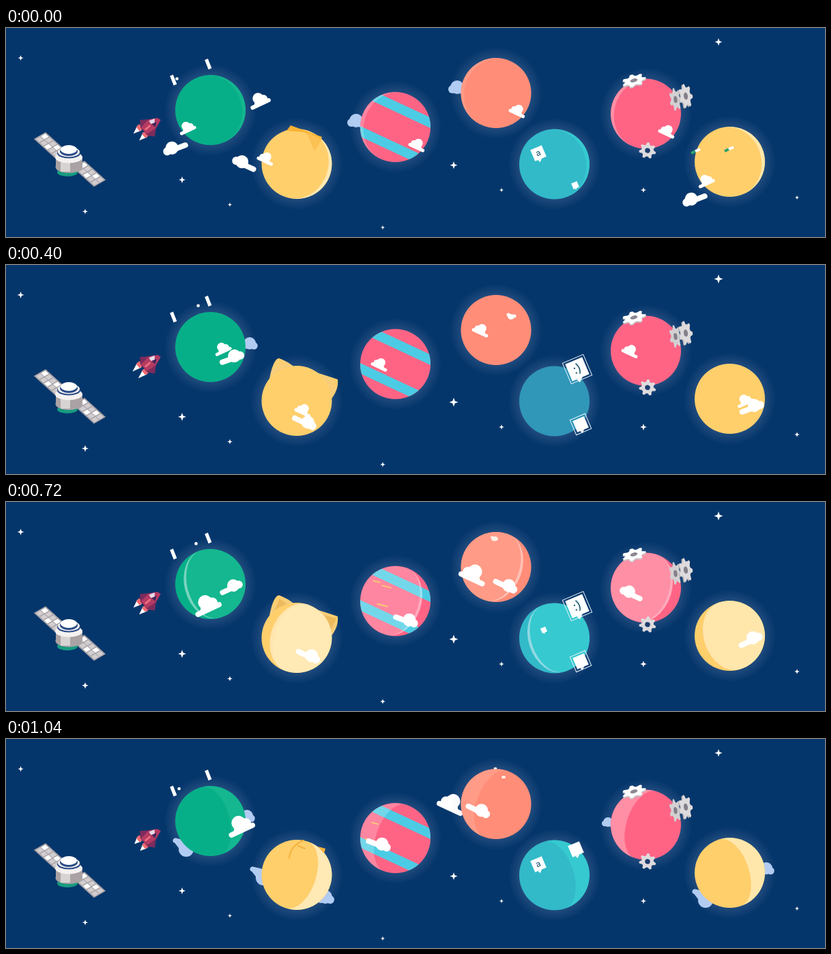
An HTML page with a canvas that plays this animation: 1200 px wide and 307 px high, repeating every 1.08 s.

```html
<!DOCTYPE html>
<html lang="en">
<head>
<meta charset="utf-8">
<title>Planets</title>
<style>
html, body { margin: 0; width: 100%; height: 100%; overflow: hidden; background: #05366b; }
canvas { display: block; width: 1200px; height: 307px; }
</style>
</head>
<body>
<canvas id="stage" width="1200" height="307"></canvas>
<script>
const c = document.getElementById('stage').getContext('2d');
const LOOP = 1080, STEP = 40, TAU = Math.PI * 2, R = 51.5;
const WHITE = '#fff', HAZE = '#b0ccf3', YELLOW = '#ffcf6c', PINK = '#ff6485';
let t = 0;

const lerp = (a, b, k) => a + (b - a) * k;
const ramp = (a, b) => Math.min(1, Math.max(0, (t - a) / (b - a)));
const during = (a, b) => t >= a && t < b;

function poly(color, ...p) {
  c.fillStyle = color;
  c.beginPath();
  for (let i = 0; i < p.length; i += 2) c.lineTo(p[i], p[i + 1]);
  c.closePath();
  c.fill();
}
function oval(color, x, y, rx, ry = rx, a = 0) {
  c.fillStyle = color;
  c.beginPath();
  c.ellipse(x, y, rx, ry, a, 0, TAU);
  c.fill();
}
function line(color, w, x1, y1, x2, y2, cap = 'butt') {
  c.strokeStyle = color;
  c.lineWidth = w;
  c.lineCap = cap;
  c.beginPath();
  c.moveTo(x1, y1);
  c.lineTo(x2, y2);
  c.stroke();
}
function placed(x, y, deg, draw) {
  c.save();
  c.translate(x, y);
  c.rotate(deg * Math.PI / 180);
  draw();
  c.restore();
}

function star(x, y, r) {
  r *= .9 + .2 * Math.sin(Math.PI * t / LOOP);
  c.fillStyle = WHITE;
  c.beginPath();
  for (let i = 0; i < 8; i++) {
    const d = i % 2 ? r * .38 : r, a = i * TAU / 8;
    c.lineTo(x + d * Math.cos(a), y + d * Math.sin(a));
  }
  c.fill();
}

// Clouds: a puff on a bar, or a blob with a tail; m mirrors the shape.
function puff(x, y, m = 1, s = .8, color = WHITE) {
  placed(x, y, -25 * m, () => {
    c.scale(m * s, s);
    line(color, 6, -13, 5, 13, 5, 'round');
    poly(color, -10, 4, -5, -4, 10, -2, 13, 5);
    oval(color, 0, -4, 8);
    oval(color, 7, 0, 6);
  });
}
function tail(x, y, deg, m = 1, s = 1, color = WHITE) {
  placed(x, y, deg, () => {
    c.scale(m * s, s);
    line(color, 8, -6, 3, 15, 1, 'round');
    oval(color, -5, 0, 9.5);
    oval(color, -13, 3, 6);
  });
}
function haze(x, y, s = 1) {
  oval(HAZE, x, y, 10 * s);
  oval(HAZE, x - 7 * s, y + 3 * s, 6 * s);
  oval(HAZE, x + 7 * s, y + 4 * s, 6 * s);
}
function wisp(x, y) {
  line(HAZE, 7, x - 12, y - 9, x + 4, y - 5, 'round');
  poly(HAZE, x - 14, y - 7, x - 4, y + 6, x + 8, y - 4);
  oval(HAZE, x + 4, y + 4, 11);
}
// First pass: rest, cross the middle, reach the far side.
function drift(draw, x0, y0, x1, y1, x2, y2) {
  if (t >= 580) return;
  const a = ramp(180, 320), b = ramp(320, 520);
  draw(lerp(lerp(x0, x1, a), x2, b), lerp(lerp(y0, y1, a), y2, b));
}
// Second pass: one slide, then rest.
function slide(draw, x0, y0, x1, y1) {
  if (t < 580) return;
  const k = ramp(720, 880);
  draw(lerp(x0, x1, k), lerp(y0, y1, k));
}

// Lit strip between two meridians of the sphere.
function strip(u0, u1, deg, color) {
  placed(0, 0, deg, () => {
    c.fillStyle = color;
    c.beginPath();
    c.ellipse(0, 0, Math.abs(u0) * R, R, 0, -Math.PI / 2, Math.PI / 2, u0 < 0);
    c.ellipse(0, 0, Math.abs(u1) * R, R, 0, Math.PI / 2, -Math.PI / 2, u1 >= 0);
    c.fill();
  });
}
function shade(side, deg, light, from, to) {
  if (t < 240) strip(side * .9, side, deg, light);
  else if (during(420, 580)) strip(-side * .9, -side, deg, light);
  else if (t >= 580) {
    const k = ramp(from, to), u = lerp(-.66, .55, k);
    strip(side * u, side, deg, light);
    if (k < 1) strip(side * (u - .08), side * u, deg, 'rgba(255,255,255,.45)');
  }
}
function planet(x, y, color, side, deg, light, marks, from = 720, to = 880) {
  const g = c.createRadialGradient(x, y, R - 2, x, y, R + 16);
  g.addColorStop(0, 'rgba(190,195,230,.16)');
  g.addColorStop(1, 'rgba(190,195,230,0)');
  oval(g, x, y, R + 16);
  c.save();
  oval(color, x, y, R);
  c.clip();
  c.translate(x, y);
  if (marks) marks();
  shade(side, deg, light, from, to);
  c.restore();
}

function panel(x, y) {
  c.save();
  c.transform(.74, .67, -.86, .5, x, y);
  c.fillStyle = '#a5a0a5';
  c.fillRect(0, 0, 42, 20);
  for (let i = 0; i < 5; i++) for (let j = 0; j < 2; j++) {
    c.fillStyle = (i + j) % 3 ? '#d2cdcf' : WHITE;
    c.fillRect(2 + i * 8, 2 + j * 8.5, 6.5, 7.5);
  }
  c.restore();
}
function satellite() {
  panel(58, 153);
  panel(115, 195);
  oval('#189b80', 90, 212, 15, 6);
  c.fillStyle = '#aaa2a4';
  c.fillRect(73, 190, 39, 14);
  oval('#aaa2a4', 92, 204, 19.5, 9);
  c.fillStyle = '#d8d3d3';
  c.fillRect(80, 196, 14, 15);
  oval('#f4f1f0', 92, 190, 20, 8.5);
  oval('#294b86', 92, 184, 17, 7.5);
  oval('#f1eff1', 92, 182, 16, 7.5);
  oval('#294b86', 92, 181, 13, 7);
  oval(WHITE, 92, 178.5, 12, 6.5);
}
function rocket() {
  const f = 1 + .08 * Math.sin(t * TAU / 180);
  placed(208, 146, -40, () => {
    c.scale(.93, .93);
    for (const y of [-9, 5]) {
      poly(WHITE, -11, y - 4, -24 * f, y + 2, -11, y + 6);
      poly('#f06a70', -7, y - 4, -14, y - 3, -14, y + 5, -7, y + 6);
    }
    poly('#7d2c5c', -9, -8, -2, -17, 9, -9, 9, 9, -1, 18, -9, 9);
    poly('#b43b63', -8, -7, 9, -9, 21, -2, 23, 4, 9, 9, -8, 7);
    poly('#e4dceb', 8, -7, 17, -4, 13, 1, 7, -1);
    poly('#3a285b', 8, 0, 16, 2, 9, 7);
    line('#ef6d7d', 3, -6, 0, 5, 0);
  });
}

function pong() {
  line(WHITE, 5, 293.5, 46, 299, 60);
  line(WHITE, 5, 242.5, 69.5, 248, 83.5);
  const k = 1 - Math.abs(t - 540) / 540;
  oval(WHITE, lerp(250.5, 292.5, k), lerp(74.5, 54.5, k), 2.3);
}
function catEars() {
  const inner = t >= 580 ? '#f3b94e' : YELLOW;
  c.fillStyle = YELLOW;
  c.beginPath();
  c.moveTo(385, 175);
  c.bezierCurveTo(388, 152, 394, 137, 400, 137);
  c.quadraticCurveTo(412, 141, 424, 151);
  c.moveTo(452, 157);
  c.quadraticCurveTo(471, 163, 486, 168);
  c.quadraticCurveTo(488, 184, 474, 200);
  c.fill();
  poly(inner, 391, 165, 401, 142, 412, 150);
  poly(inner, 466, 166, 484, 171, 476, 188);
}
function foldedEars() {
  if (t < 240) {
    poly('#f6b334', 411, 151, 417, 143, 463, 160, 460, 168, 437, 153);
    poly('#fbc152', 440, 153, 463, 163, 452, 181);
  } else if (during(420, 580)) {
    poly('#f3b744', 418, 152, 423, 145, 470, 163, 467, 171, 442, 154);
  } else if (t >= 800) {
    c.strokeStyle = '#f5b33d';
    c.lineWidth = 2;
    c.beginPath();
    c.moveTo(415, 175);
    c.quadraticCurveTo(416, 157, 436, 149);
    c.moveTo(428, 157);
    c.lineTo(438, 161);
    c.stroke();
    poly('#f5b33d', 457, 158, 468, 161, 466, 168);
  }
}
function stripes() {
  placed(0, 0, 25, () => {
    c.fillStyle = '#4ccce4';
    for (const y of [-27.5, 27.5]) c.fillRect(-60, y - 7, 120, 14);
  });
  const dash = (x, y, w) => line('#f8b94d', 2, x, y, x + w, y + w * .26);
  if (during(420, 580)) {
    dash(8, -10, 24);
    dash(13, 3, 19);
    dash(6, 16, 18);
  } else if (during(580, 800)) {
    dash(-33, -30, 11);
    dash(-20, -23, 14);
    dash(-27, 4, 16);
  } else if (t >= 800) {
    dash(-35, -23, 10);
    dash(-44, 1, 8);
  }
}
function crumbs() {
  if (during(240, 580)) {
    const color = t < 420 ? WHITE : '#ffe5cb';
    oval(color, 740, 76, 5, 4);
    oval(color, 736, 73, 2.5);
    oval(color, 745, 75, 2.5);
    if (t >= 420) {
      oval(WHITE, 731, 82, 2);
      oval(WHITE, 748, 85, 2);
    }
  } else if (during(580, 960)) {
    oval('#fff0e6', 716, 54, 5, 3.5);
    oval('#fff0e6', 712, 52, 2);
    if (t >= 800) oval(WHITE, 726, 56, 2);
  } else if (t >= 960) {
    oval('#fff0e6', 729, 56, 3, 2);
    oval('#fff0e6', 717, 43, 2.5, 1.5);
  }
}

function bubble(x, y, s, text, frame) {
  placed(x, y, -23, () => {
    const h = s / 2;
    if (frame) {
      c.strokeStyle = '#e4f1f8';
      c.lineWidth = 1;
      c.strokeRect(-h - 3, -h - 3, s + 6, s + 6);
    }
    c.fillStyle = WHITE;
    c.fillRect(-h, -h, s, s);
    poly(WHITE, -h * .5, h, h * .2, h, -h * .3, h * 1.45);
    if (text) {
      c.fillStyle = '#17566f';
      c.font = `${s * .68}px Inter, sans-serif`;
      c.textAlign = 'center';
      c.textBaseline = 'middle';
      c.fillText(text, 0, 0);
    }
  });
}
function chat() {
  if (t < 100 || t >= 840) bubble(780, 184, 18, 'a');
  else if (t < 240) bubble(782, 186, 14);
  else if (t >= 640) bubble(788, 188, lerp(5, 12, ramp(640, 840)));
  if (during(80, 960)) bubble(837, 153, 27, t < 240 ? '' : ':)', true);
  else if (t >= 960) bubble(835, 162, 18);
  if (during(80, 800)) bubble(842, 234, 18, '', true);
  else if (t < 80) bubble(834, 231, 9);
  else if (t < 1000) bubble(838, 233, 13);
}

function gear(x, y, rx, ry, deg, color, hole) {
  placed(x, y, deg, () => {
    c.scale(rx, ry);
    c.fillStyle = color;
    c.beginPath();
    for (let i = 0; i < 28; i++) {
      const d = i % 4 < 2 ? 1 : .72, a = i * TAU / 28;
      c.lineTo(d * Math.cos(a), d * Math.sin(a));
    }
    c.closePath();
    c.fill();
    oval(hole, 0, 0, .3);
  });
}
function gears() {
  gear(920, 79, 18, 9, -15, '#c9c5c8', PINK);
  gear(920, 77, 18, 9, -15, WHITE, '#8b8792');
  gear(981, 105, 9, 17, -8, '#d3d0d2', '#85808a');
  gear(994, 101, 9, 18, -8, '#b9b4b8', '#85808a');
  gear(996, 100, 10, 18, -8, '#dedbdd', '#85808a');
  gear(940, 180, 12.5, 12, 12, '#dedbdd', '#1c3d6e');
}

function flags() {
  const mark = (x, y) => {
    line('#2fa36b', 4, x, y, x + 6, y - 3);
    line(WHITE, 4, x + 6, y - 3, x + 13, y - 6);
  };
  if (t < 240) {
    mark(1004, 184);
    mark(1053, 181);
  } else if (during(420, 580)) {
    mark(1052, 207);
    mark(1065, 227);
    line('#2c4a70', 4, 1012, 180, 1020, 177);
    line('#2c4a70', 4, 1088, 209, 1112, 199);
    c.setLineDash([5, 1]);
    line('#f3c45f', 5, 1089, 152, 1111, 142);
    c.setLineDash([]);
  }
}

function tailTurn(deg0, deg1) {
  return (x, y) => t < 250 ? tail(x, y, deg0) : tail(x, y, deg1, -1);
}
const left = (x, y) => puff(x, y);
const right = (x, y) => puff(x, y, -1);

function green() {
  if (during(200, 420)) haze(357, 115, .9);
  if (during(420, 580)) haze(256, 157);
  if (t >= 800) { wisp(260, 158); haze(353, 113, .9); }
  planet(299.5, 120.5, '#07af88', 1, -15, '#14b78f');
  pong();
  if (t < 200) puff(371, 107, 1, 1);
  drift(left, 265, 147, 301, 131, 341, 112);
  drift(tailTurn(-15, -25), 248, 175, 303, 148, 371, 117);
  slide((x, y) => puff(x, y, 1, 1.3), 294, 152, 343, 128);
  if (during(580, 800)) tail(329, 125, -30, -1, .95);
}
function cat() {
  if (during(420, 580)) haze(369, 195);
  if (t >= 800) { wisp(373, 200); haze(468, 232); }
  if (during(240, 420) || during(580, 800)) catEars();
  planet(426, 199.5, YELLOW, 1, 18, '#ffe9b4');
  foldedEars();
  drift(right, 381, 192, 420, 208, 460, 222);
  drift(tailTurn(30, 20), 350, 199, 410, 218, 479, 246);
  if (during(580, 800)) tail(443, 224, 20, -1);
}
function striped() {
  if (t < 240) haze(513, 136);
  planet(570.5, 145.5, PINK, -1, 18, 'rgba(255,255,255,.22)', stripes);
  drift(right, 603, 172, 563, 153, 526, 136);
  slide((x, y) => tail(x, y, 15, -1), 586, 172, 546, 153);
}
function coral() {
  if (t < 240) haze(661, 87);
  const big = (x, y) => puff(x, y, -1, 1.3);
  if (t >= 800) slide(big, 685, 107, 653, 96);
  planet(718, 95.5, '#ff8d78', -1, 20, '#ff9b87');
  crumbs();
  drift(right, 750, 122, 711, 102, 674, 87);
  if (during(440, 580)) puff(771, 140, -1, 1.1);
  if (t < 800) slide(big, 685, 107, 653, 96);
  slide((x, y) => tail(x, y, 20, -1), 732, 121, 692, 103);
}
function teal() {
  planet(803.5, 200, during(240, 420) ? '#3097b9' : '#32bac9', 1, -18, '#36c9d0');
  chat();
}
function geared() {
  if (t >= 1000) haze(882, 122, .7);
  planet(937.5, 126, PINK, -1, 18, '#ff8fa5', null, 900, 1020);
  gears();
  drift(right, 969, 152, 930, 133, 893, 117);
  if (during(580, 1000)) tail(917, 134, 30, 1, .95);
}
function sunny() {
  if (during(420, 580)) haze(1018, 234);
  if (t >= 800) { wisp(1021, 233); haze(1114, 190, .9); }
  planet(1060.5, 196.5, YELLOW, 1, -18, '#ffe7ac');
  flags();
  drift(left, 1025, 225, 1069, 208, 1102, 187);
  drift(tailTurn(-15, -25), 1009, 250, 1065, 220, 1132, 191);
  if (during(580, 800)) tail(1090, 202, -30, -1);
}

function frame(now) {
  t = Math.floor(now % LOOP / STEP) * STEP;
  c.fillStyle = '#05366b';
  c.fillRect(0, 0, 1200, 307);
  star(21.5, 44, 4.5);
  star(1044, 20.5, 6);
  star(116, 269.5, 4.5);
  star(258, 223, 5.5);
  star(328, 259.5, 3.5);
  star(552, 293, 3.5);
  star(656, 201.5, 6);
  star(726, 238, 3.5);
  star(934, 238, 4.5);
  star(1159, 249, 3.5);
  satellite();
  rocket();
  [green, cat, striped, coral, teal, geared, sunny].forEach(draw => draw());
}

const start = performance.now();
function tick() {
  frame(performance.now() - start);
  requestAnimationFrame(tick);
}
tick();
</script>
</body>
</html>
```
